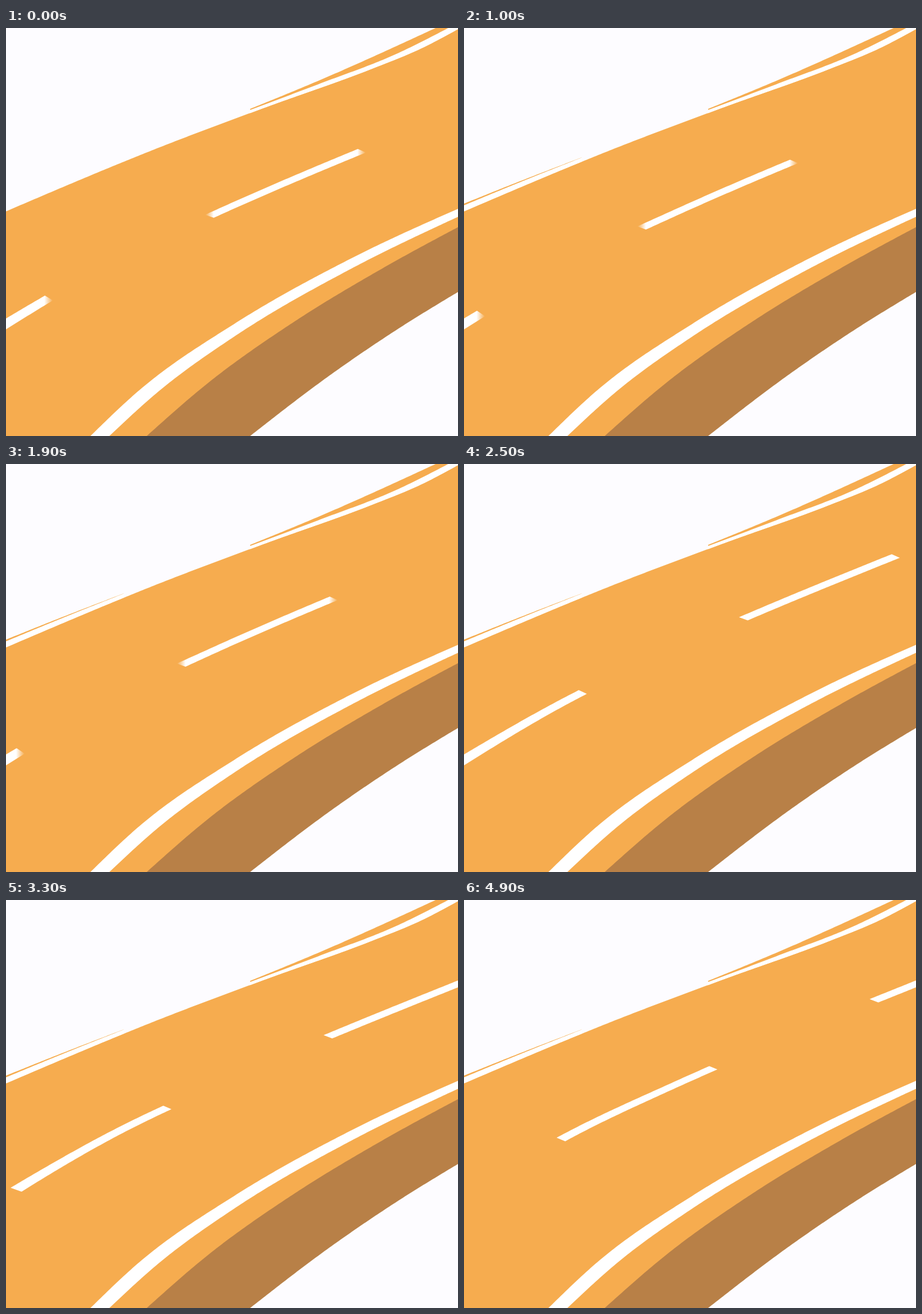
Animation of 787 by 711 pixels, one loop 5000 ms. Source, as an HTML page with a canvas:

```html
<!DOCTYPE html>
<html lang="en">
<head>
<meta charset="utf-8">
<title>Road</title>
<style>
  html, body { margin: 0; width: 100%; height: 100%; overflow: hidden; background: #fdfcff; }
  canvas { display: block; }
</style>
</head>
<body>
<canvas id="stage" width="787" height="711"></canvas>
<script>
const W = 787, H = 711, LOOP = 5000, STEP = 100;
const PAPER = '#fdfcff', ROAD = '#f6ac4f', SIDE = '#b88047', WHITE = '#fff';
const SPEED = 0.595, SPACING = 545, LENGTH = 280, FIRST = 342; // px per ms, px
const RIM = 425, LEFT_RIM = 205, SOFT_UNTIL = 2000;
const ctx = document.getElementById('stage').getContext('2d');

// Smooth y(x) through a few points, with parabolic tangents
function curve(...p) {
  const last = p.length - 1;
  const chord = i => (p[i + 1][1] - p[i][1]) / (p[i + 1][0] - p[i][0]);
  const inner = i => {
    const a = p[i][0] - p[i - 1][0], b = p[i + 1][0] - p[i][0];
    return (a * chord(i) + b * chord(i - 1)) / (a + b);
  };
  const slope = i =>
    i === 0 ? 1.5 * chord(0) - 0.5 * inner(1) :
    i === last ? 1.5 * chord(last - 1) - 0.5 * inner(last - 1) : inner(i);
  return x => {
    let i = 0;
    while (i < last - 1 && x > p[i + 1][0]) i++;
    const d = p[i + 1][0] - p[i][0], u = (x - p[i][0]) / d, w = 1 - u;
    return p[i][1] * (1 + 2 * u) * w * w + slope(i) * d * u * w * w
         + p[i + 1][1] * u * u * (3 - 2 * u) - slope(i + 1) * d * u * u * w;
  };
}

const edge = curve([0, 319.5], [275, 205], [450, 139], [640, 70], [720, 37], [787, 2]);
const rimTop = curve([395, 153], [560, 85], [748, 0]);
const rimLow = curve([395, 154], [545, 97.5], [680, 45], [770, 0]);
const leftTop = curve([0, 306], [100, 266], [225, 218]);
const leftLow = x => leftTop(x) + 3 * (1 - x / 225);
const lineTop = curve([147, 711], [230, 633], [400, 514], [600, 402], [787, 315]);
const lineLow = curve([180, 711], [260, 638], [400, 536], [600, 420], [787, 329]);
const sideTop = curve([245, 711], [350, 620], [500, 513], [650, 422], [787, 347]);
const sideLow = curve([425, 711], [560, 608], [680, 526], [787, 460]);
const dashTop = curve([-40, 530], [200, 394], [361, 319], [830, 123]);
const dashLow = x => dashTop(x) + 12 + 7 * Math.max(0, 1 - x / 400) ** 2;
const bottom = () => H + 2;

// Area between two curves; each has its own x range
function band(top, low, a, b, color, c = a, d = b) {
  ctx.beginPath();
  for (let x = a; x < b; x += 4) ctx.lineTo(x, top(x));
  ctx.lineTo(b, top(b));
  for (let x = d; x > c; x -= 4) ctx.lineTo(x, low(x));
  ctx.lineTo(c, low(c));
  ctx.fillStyle = color;
  ctx.fill();
}

function fade(left, right) {
  const g = ctx.createLinearGradient(left, 0, right, 0), f = 15 / (right - left);
  g.addColorStop(0, '#fff0');
  g.addColorStop(f, WHITE);
  g.addColorStop(1 - f, WHITE);
  g.addColorStop(1, '#fff0');
  return g;
}

function dash(left, soft) {
  const right = left + LENGTH;
  const paint = soft ? fade(left, right) : WHITE;
  const slant = left < 150 ? 19 : 15;
  band(dashTop, dashLow, left, right - 14, paint, left + slant, right);
}

function draw(t) {
  ctx.fillStyle = PAPER;
  ctx.fillRect(0, 0, W, H);
  band(edge, bottom, -2, W + 2, ROAD);
  band(rimLow, edge, RIM, 771, WHITE, RIM, W + 2);
  band(rimTop, rimLow, RIM, 750, ROAD, RIM, 772);

  const reach = LEFT_RIM * Math.min(1, t / 300);
  if (reach) {
    band(leftLow, edge, -2, reach, WHITE);
    band(leftTop, leftLow, -2, reach, ROAD);
  }

  band(sideTop, bottom, 243, W + 2, SIDE);
  band(sideLow, bottom, 423, W + 2, PAPER);
  band(lineTop, lineLow, 145, W + 2, WHITE, 178, W + 2);

  // Steady travel with a slight sway
  const sway = 11 * Math.cos((t - 700) / 3900 * 2 * Math.PI);
  const shift = FIRST - SPEED * t + sway;
  let x = shift - Math.ceil((shift + LENGTH) / SPACING) * SPACING;
  for (; x < W; x += SPACING) if (x + LENGTH > 0) dash(x, t < SOFT_UNTIL);
}

const start = performance.now();
function tick() {
  const t = (performance.now() - start) % LOOP;
  draw(Math.floor(t / STEP) * STEP);
  requestAnimationFrame(tick);
}
tick();
</script>
</body>
</html>
```
